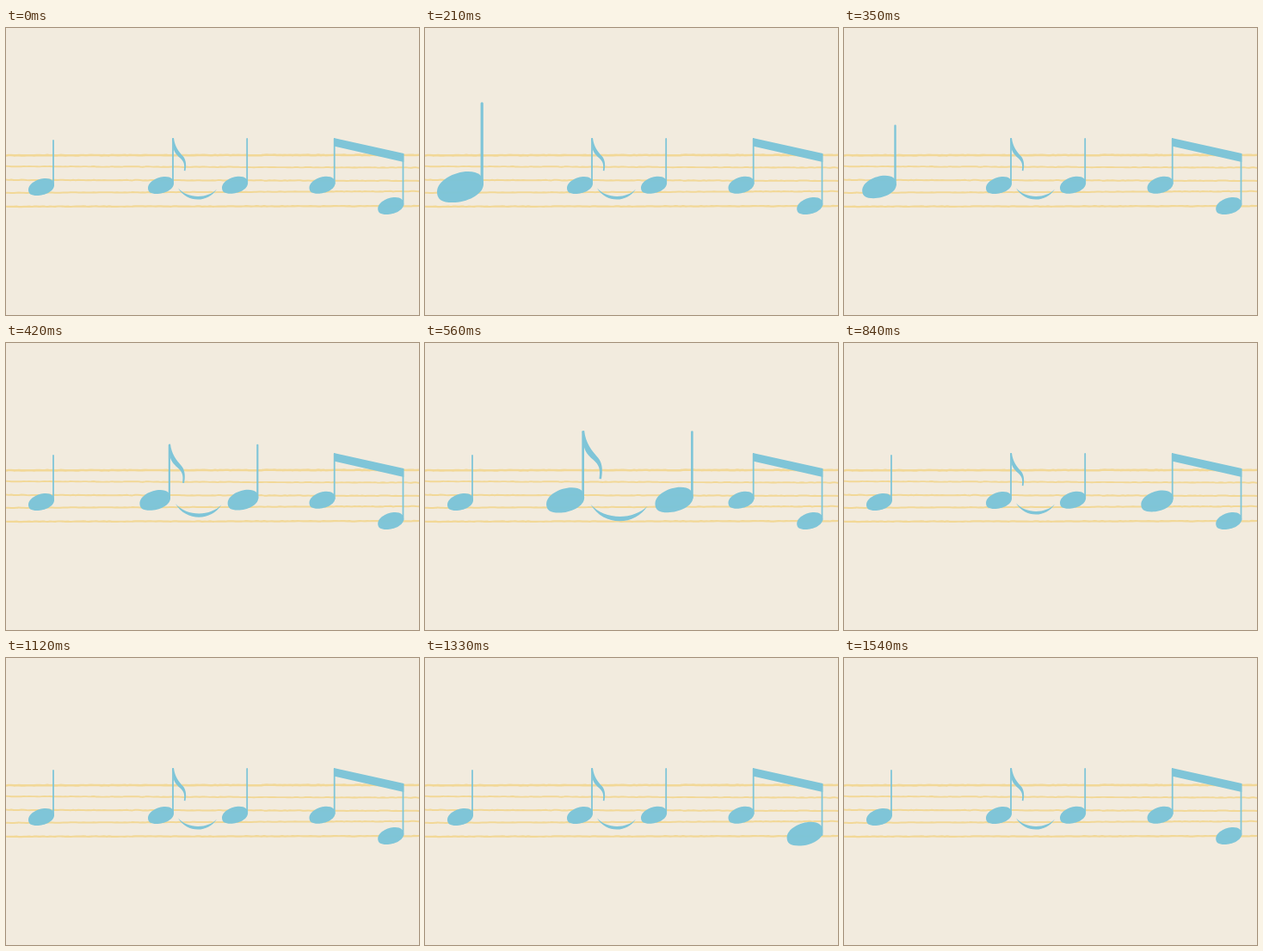
Recreate the animation shown at these times as an HTML page. Size 480x334 px, loop 1610 ms.

```html
<!DOCTYPE html>
<html lang="en">
<head>
<meta charset="utf-8">
<title>Bouncing notes</title>
<style>
  html, body { margin: 0; width: 100%; height: 100%; overflow: hidden; background: #f2ebde; }
  svg { display: block; width: 100vw; height: 100vh; }
  .ink { fill: #7dc5d8; }
  .stem { stroke: #7dc5d8; stroke-width: 1.8; stroke-linecap: round; }
  #staff path { fill: none; stroke: #f2d897; stroke-linejoin: round; }
</style>
</head>
<body>
<svg viewBox="0 0 480 334">
  <defs>
    <path id="head" d="M-15 3C-15-4-4-10 5-10C12-10 15-7 15-2C15 5 4 10-5 10C-12 10-15 8-15 3Z"/>
  </defs>
  <rect width="480" height="334" fill="#f2ebde"/>
  <g id="staff"></g>

  <g id="quarter" class="ink" opacity=".98">
    <use href="#head" x="41" y="185"/>
    <path class="stem" d="M55 131V183"/>
  </g>

  <g id="tied" class="ink" opacity=".98">
    <use href="#head" x="180" y="183"/>
    <path class="stem" d="M194 129V181"/>
    <path d="M193.3 128.3L195 128C196 138 201 144 206 149.5C209.6 154 209.6 160 208.5 166.3L206.8 166C208 158 206.5 155 202 151C198 147.5 195 144 194.6 139Z"/>
    <path d="M200 186.3C210 203.8 235 203.8 245 187.5C234 199 211 199 200 186.3Z"/>
    <use href="#head" x="266" y="182.7"/>
    <path class="stem" d="M280.2 129V181"/>
  </g>

  <g class="ink" opacity=".98">
    <path d="M381 128L462.3 146V156L381 137.5Z"/>
    <path class="stem" d="M381.7 129V181M461.5 147V206"/>
    <use id="upper" href="#head" x="367.5" y="182.7"/>
    <use id="lower" href="#head" x="447.2" y="207"/>
  </g>
</svg>
<script>
  const STEP = 70, STEPS = 23;
  const el = id => document.getElementById(id);

  // Each pulse: first resting step, peak scale, pivot.
  const pulses = [
    { node: el('quarter'), start: 0, peak: 1.8, x: 41, y: 185 },
    { node: el('tied'), start: 5, peak: 1.47, x: 216, y: 183.2 },
    { node: el('upper'), start: 10, peak: 1.34, x: 382.2, y: 177.5 },
    { node: el('lower'), start: 16, peak: 1.39, x: 462, y: 213 }
  ];

  let seed = 7;
  const rand = () => (seed = seed * 16807 % 2147483647) / 2147483647;

  // Staff lines with a slight crayon wobble: left y, right y, width.
  function drawStaff() {
    const lines = [
      [148.2, 147.8, 2.6], [161, 162.5, 1.9], [176.8, 177.8, 2],
      [191.8, 190, 2], [207.8, 207.2, 2.2]
    ];
    for (const [left, right, width] of lines) {
      const pts = [];
      for (let x = -3; x <= 483; x += 3) {
        const y = left + (right - left) * x / 480 + (rand() - 0.5) * 0.6;
        pts.push(x + ' ' + y.toFixed(2));
      }
      const path = document.createElementNS('http://www.w3.org/2000/svg', 'path');
      path.setAttribute('d', 'M' + pts.join('L'));
      path.setAttribute('stroke-width', width);
      el('staff').append(path);
    }
  }

  // Three steps up, three steps down.
  function swell(step) {
    if (step <= 0 || step >= 6) return 0;
    return Math.pow(1 - Math.abs(step - 3) / 3, 0.83);
  }

  function render(ms) {
    const step = Math.floor(ms / STEP) % STEPS;
    for (const { node, start, peak, x, y } of pulses) {
      const s = 1 + (peak - 1) * swell(step - start);
      node.setAttribute('transform',
        `translate(${x} ${y}) scale(${s}) translate(${-x} ${-y})`);
    }
  }

  drawStaff();
  render(0);
  const begin = performance.now();
  function tick() {
    render(performance.now() - begin);
    requestAnimationFrame(tick);
  }
  requestAnimationFrame(tick);
</script>
</body>
</html>
```
